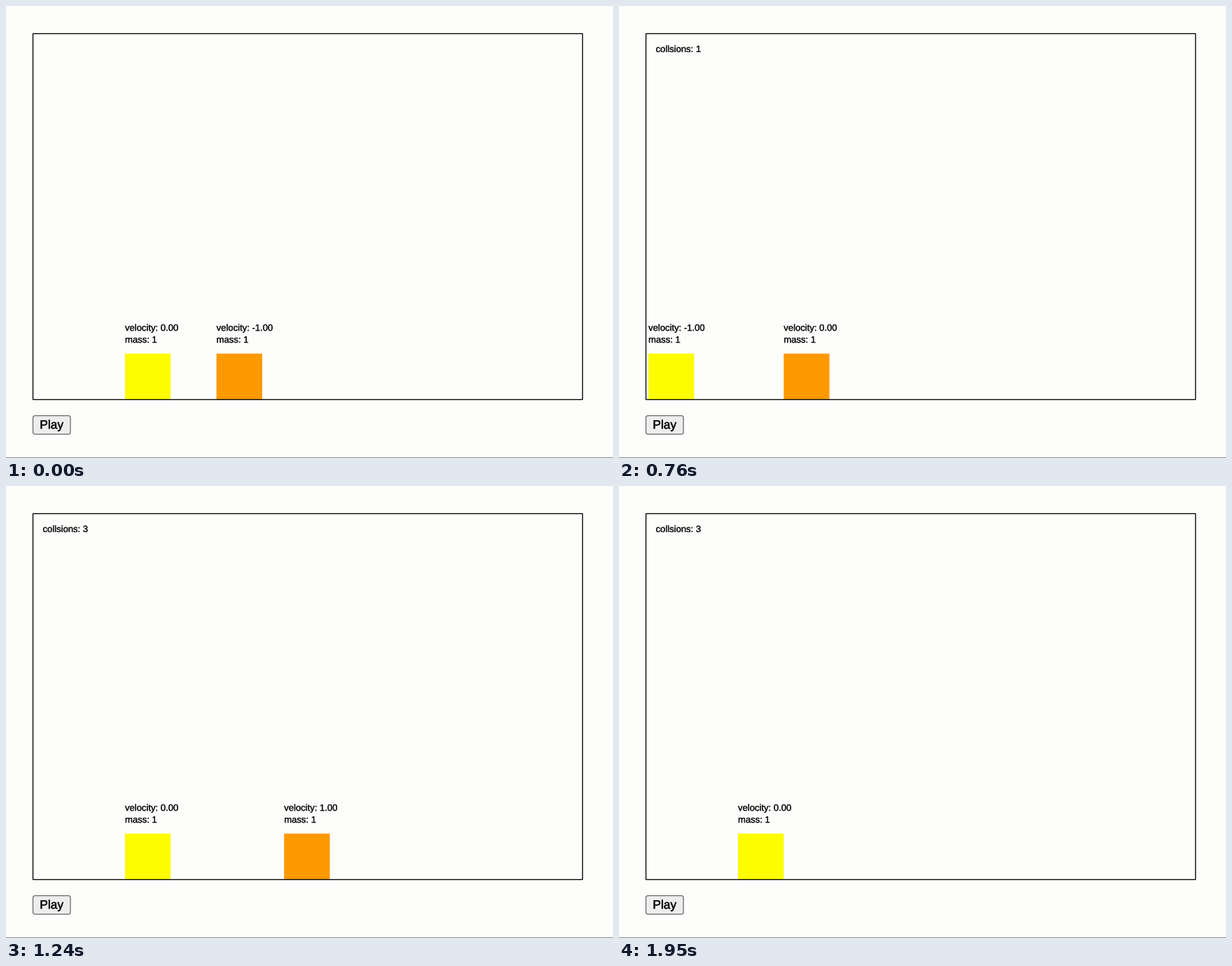
Animation of 867x646 px, one loop 2 s. Source, as a matplotlib script:

```python
import matplotlib.pyplot as plt
import numpy as np
from matplotlib.animation import FuncAnimation
from matplotlib.patches import FancyBboxPatch, Polygon, Rectangle
from matplotlib.patheffects import withStroke

W, H, DPI = 867, 646, 100
LOOP, TICK, STEPS = 2000, 10, 42      # ms, ms, visible poses per loop
PX = 72 / DPI                         # one pixel in points
X0, Y0, SCALE = 39.4, 39.7, 1.306     # canvas origin and zoom
WIDTH, FLOOR, SIDE = 600, 400, 50     # canvas units
START, SPEED = 9.468, 22.66           # first moving pose, units per pose

plt.rcParams["font.family"] = "Liberation Sans"

fig = plt.figure(figsize=(W / DPI, H / DPI), dpi=DPI, facecolor="#fdfdfb")
ax = fig.add_axes([0, 0, 1, 1])
ax.set_xlim(0, W)
ax.set_ylim(H, 0)
ax.axis("off")


def cx(u):
    return X0 + u * SCALE


def cy(v):
    return Y0 + v * SCALE


stage = Rectangle((38.5, 39.5), 785, 523, fc="none", ec="black",
                  lw=1.35 * PX, snap=False, zorder=4)
ax.add_patch(stage)
ax.add_patch(Rectangle((0, 645), W, 1, fc="#8b8b8e", lw=0))


def write(x, y, text, size, color):
    bold = [withStroke(linewidth=0.3 * PX, foreground=color)]
    return ax.text(x, y, text, size=size * SCALE * PX, color=color,
                   va="baseline", zorder=3, path_effects=bold)


def label(u, v, text=""):
    t = write(cx(u), cy(v), text, 10, "#161616")
    t.set_clip_path(stage)
    return t


class Block:
    def __init__(self, color):
        self.rect = Rectangle((0, cy(FLOOR - SIDE)), SIDE * SCALE,
                              SIDE * SCALE, fc=color, lw=0, snap=False)
        ax.add_patch(self.rect)
        self.rect.set_clip_path(stage)
        self.speed = label(0, 325)
        self.mass = label(0, 338, "mass: 1")

    def place(self, u, v):
        self.speed.set_text(f"velocity: {v:.2f}")
        for part in (self.rect, self.speed, self.mass):
            part.set_x(cx(u))
            part.set_visible(u < WIDTH)


yellow, orange = Block("#fdfd00"), Block("#ff9900")
counter = label(10, 20)

button = FancyBboxPatch((38.5, 585.5), 53.5, 26.5, lw=1.3 * PX,
                        boxstyle="round,pad=0,rounding_size=3")
ax.add_patch(button)
write(48.2, 604.1, "Play", 13.333, "black")

ARROW = np.array([(0, 0), (0, 17), (3.9, 13.5), (6.6, 20.2), (9.3, 19),
                  (6.5, 12.5), (11.8, 12.2)])
cursor = Polygon(ARROW, fc="black", ec="white", lw=1.4 * PX, zorder=6)
ax.add_patch(cursor)


def pose(s):
    """Positions, velocities and hit count after s units of travel.

    Equal masses swap speeds, so only one block moves at a time:
    orange in, yellow to the wall and back, orange out.
    """
    hits = sum(s >= mark for mark in (50, 150, 250))
    heading = -1 if s < 150 else 1
    yellow_moves = hits in (1, 2)
    return (min(100, abs(150 - s)), heading * yellow_moves,
            max(150, 200 - s, s - 100), heading * (not yellow_moves), hits)


def draw(i):
    k = int((i + 0.5) * TICK * STEPS / LOOP)
    s = int(max(0, SPEED * (k - START)))
    yu, yv, ou, ov, hits = pose(s)
    yellow.place(yu, yv)
    orange.place(ou, ov)
    counter.set_text(f"collsions: {hits}" if s > 0 else "")

    # the pointer glides in, rests on the button, clicks and leaves
    away = max(0, 7 - k, k - 10)
    cursor.set_xy(ARROW + (84 + 14 * away, 604 + 22 * away))
    button.set_facecolor("#ededed" if away else "#dddddd")
    button.set_edgecolor("#6a6a6a" if away else "#454545")
    return []


anim = FuncAnimation(fig, draw, frames=LOOP // TICK, interval=TICK,
                     repeat=True, repeat_delay=0, blit=False)
plt.show()
```
